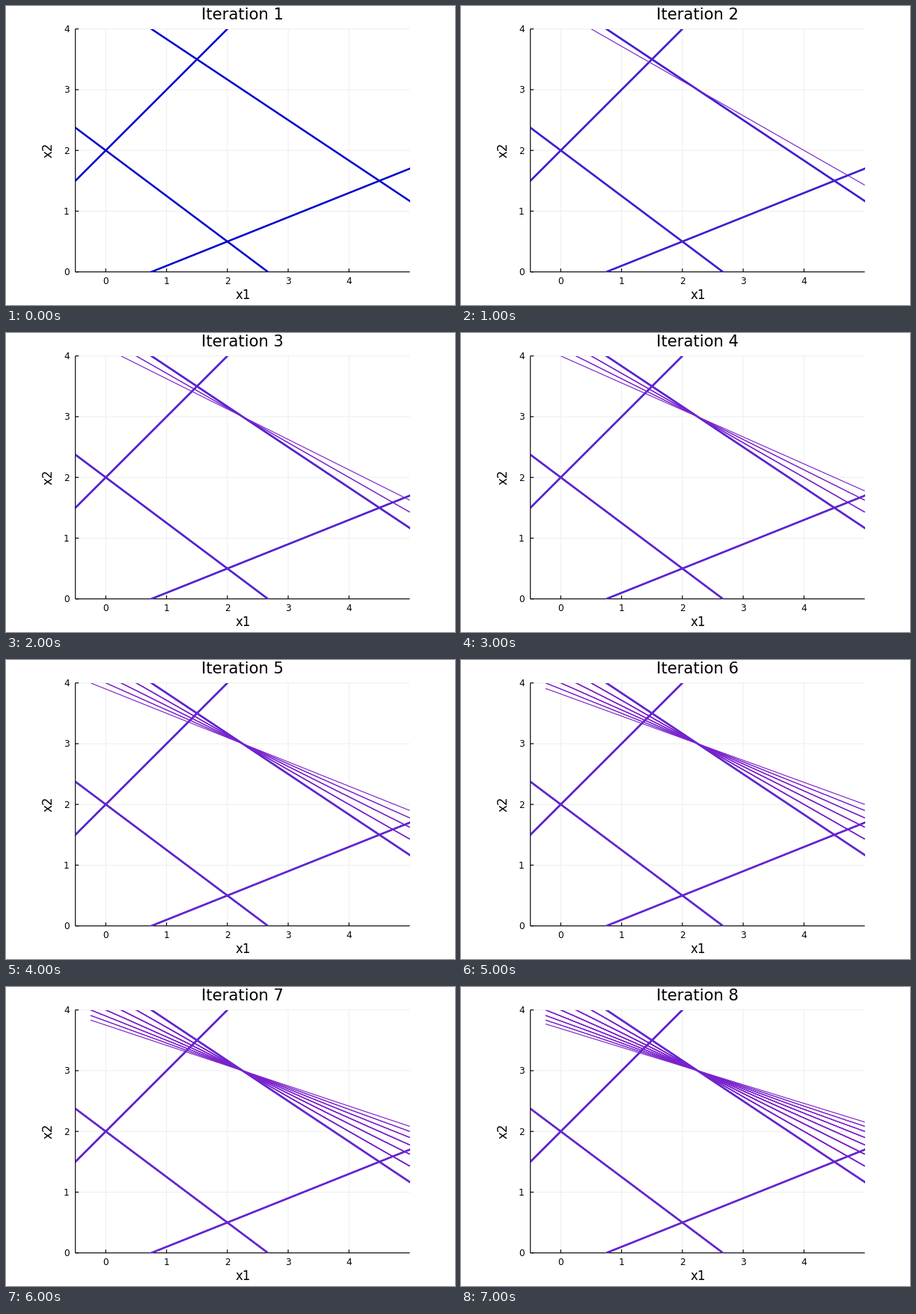
These frames come from a looping animation (600 by 400 pixels, 8 s). A matplotlib script:

```python
import matplotlib.pyplot as plt
from matplotlib.animation import FuncAnimation
from matplotlib.collections import LineCollection

W, H, DPI = 600, 400, 100
PX = 72 / DPI  # points per pixel
UNIT = 81.25   # pixels per data unit
LEFT, BASE = 92.7, 355.7
X_MIN, X_MAX, Y_MAX = -0.5, 5, 4
STEPS = 8
BLUE, VIOLET = "#0000cd", "#7a22cc"

plt.rcParams["font.family"] = "DejaVu Sans"
fig = plt.figure(figsize=(W / DPI, H / DPI), dpi=DPI, facecolor="white")
ax = fig.add_axes([LEFT / W, 1 - BASE / H,
                   (X_MAX - X_MIN) * UNIT / W, Y_MAX * UNIT / H])
ax.set_xlim(X_MIN, X_MAX)
ax.set_ylim(0, Y_MAX)
ax.axis("off")


def to_px(x, y):
    return LEFT + (x - X_MIN) * UNIT, BASE - y * UNIT


def label(x, y, text, size, **kw):
    """Text placed in pixels from the top left of the stage."""
    return fig.text(x / W, 1 - y / H, text, fontsize=size * PX,
                    color="black", **kw)


def rule(xs, ys, color, width):
    ax.plot(xs, ys, color=color, lw=width * PX, clip_on=False, snap=False,
            solid_capstyle="butt", zorder=1)


def segment(slope, offset, start=-1, end=6):
    return [(x, slope * x + offset) for x in (start, end)]


def tilted(k):
    """Upper constraint turned k steps about the point (2.25, 3)."""
    slope = -1 / (1.5 + 0.25 * k)
    return segment(slope, 3 - 2.25 * slope, -0.25, X_MAX)


def strokes(lines, color, width):
    group = LineCollection(lines, colors=color, linewidths=width * PX, zorder=3)
    ax.add_collection(group, autolim=False)
    return group


# grid, axes and ticks
for v in range(5):
    rule([v, v], [0, Y_MAX], "#eeeeee", 1)
    rule([X_MIN, X_MAX], [v, v], "#eeeeee", 1)
tick = 4.5 / UNIT
rule([X_MIN, X_MAX], [0, 0], "black", 1.15)
rule([X_MIN, X_MIN], [0, Y_MAX], "black", 1.15)
for v in range(5):
    rule([v, v], [0, tick], "black", 1.15)
    rule([X_MIN, X_MIN + tick], [v, v], "black", 1.15)
    px, py = to_px(v, v)
    label(px, 371.5, str(v), 12.1, ha="center", va="baseline")
    label(84.7, py + 4.5, str(v), 12.1, ha="right", va="baseline")

label(316.3, 392.4, "x1", 16.6, ha="center", va="baseline")
label(65.3, 193.2, "x2", 16.6, ha="right", va="center", rotation=90)
title = label(316, 18.5, "", 21.2, ha="center", va="baseline")

# fixed constraints, then one thin layer per further iteration
fixed = [segment(1, 2), segment(-0.75, 2), segment(0.4, -0.3),
         segment(-2 / 3, 4.5)]
strokes(fixed, BLUE, 2.5)
layers = [strokes(fixed + [tilted(k) for k in range(1, n + 1)], VIOLET, 1.15)
          for n in range(1, STEPS)]


def update(i):
    title.set_text(f"Iteration {i + 1}")
    for n, layer in enumerate(layers, 1):
        layer.set_visible(n <= i)
    return [title, *layers]


anim = FuncAnimation(fig, update, frames=STEPS, interval=1000,
                     repeat=True, repeat_delay=0, blit=False)
plt.show()
```
